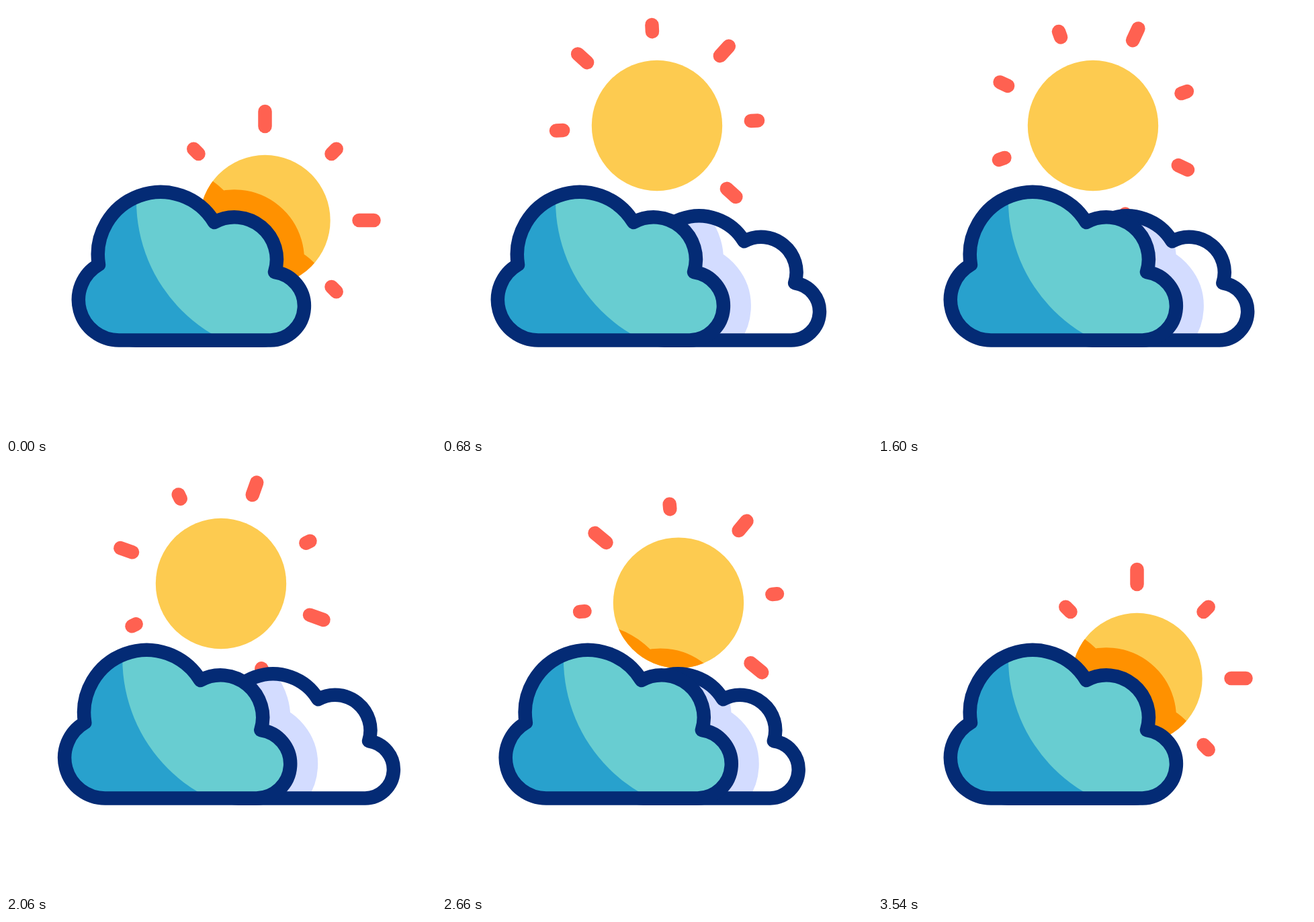
An HTML page that plays this animation: 640 by 640 pixels, repeating every 3600 ms.

```html
<!DOCTYPE html>
<html lang="en">
<head>
<meta charset="utf-8">
<title>Sun and clouds</title>
<style>
  @property --sun-x { syntax: "<length>"; inherits: true; initial-value: 385.5px; }
  @property --sun-y { syntax: "<length>"; inherits: true; initial-value: 319px; }
  @property --spin  { syntax: "<angle>";  inherits: true; initial-value: 0deg; }
  @property --front { syntax: "<length>"; inherits: true; initial-value: 0px; }
  @property --back  { syntax: "<length>"; inherits: true; initial-value: -126px; }
  @property --shade { syntax: "<length>"; inherits: true; initial-value: 0px; }
  @property --ray-a { syntax: "<length>"; inherits: true; initial-value: 22px; }
  @property --ray-b { syntax: "<length>"; inherits: true; initial-value: 22px; }
  @property --ray-c { syntax: "<length>"; inherits: true; initial-value: 22px; }
  @property --short { syntax: "<length>"; inherits: true; initial-value: 10px; }

  html, body { margin: 0; width: 100%; height: 100%; overflow: hidden; background: #fff; }
  svg {
    display: block; width: 100%; height: 100%;
    animation: 3600ms linear infinite;
    animation-name: sun-x, sun-y, spin, front, back, shade, ray-a, ray-b, ray-c, short;
  }

  .sun   { transform: translate(var(--sun-x), var(--sun-y)); }
  .rays  { transform: rotate(var(--spin)); }
  .front { transform: translate(var(--front), 0px); }
  .back  { transform: translate(calc(177.7px + var(--back)), 80.1px) scale(.839); }
  .shade { transform: translate(calc(var(--front) - var(--shade)), var(--shade)); }

  .rays line { stroke: #ff6151; stroke-width: 20.5; stroke-linecap: round; stroke-dasharray: var(--short) 99px; }
  .rays .a { stroke-dasharray: var(--ray-a) 99px; }
  .rays .b { stroke-dasharray: var(--ray-b) 99px; }
  .rays .c { stroke-dasharray: var(--ray-c) 99px; }
  .halo { stroke-width: 82; stroke-linejoin: round; }
  .line { fill: none; stroke: #042b75; stroke-width: 20.5; stroke-linejoin: round; }
  .back.line { stroke-width: 24.4; }

  @keyframes sun-x {
    0%, 2.778% { --sun-x: 385.5px; animation-timing-function: cubic-bezier(.65, 0, .78, 1); }
    18.889% { --sun-x: 320px; }
    63.889% { --sun-x: 320px; animation-timing-function: cubic-bezier(.2, 0, .36, 1); }
    94.444%, 100% { --sun-x: 385.5px; }
  }
  @keyframes sun-y {
    0%, 2.778% { --sun-y: 319px; animation-timing-function: cubic-bezier(.41, 0, .49, 1); }
    18.889% { --sun-y: 178px; }
    63.889% { --sun-y: 178px; animation-timing-function: cubic-bezier(.51, 0, .45, 1); }
    94.444%, 100% { --sun-y: 319px; }
  }
  @keyframes spin {
    0%, 2.778% { --spin: 0deg; animation-timing-function: cubic-bezier(.27, 0, .54, .95); }
    22.222% { --spin: -51deg; }
    29.444% { --spin: -56deg; }
    44.444% { --spin: -65deg; }
    57.222% { --spin: -70.5deg; }
    63.889% { --spin: -73deg; animation-timing-function: cubic-bezier(.37, .12, .57, 1); }
    94.444%, 100% { --spin: 0deg; }
  }
  @keyframes front {
    0%, 2.778% { --front: 0px; animation-timing-function: cubic-bezier(.33, 0, .67, .67); }
    22.222% { --front: -31px; }
    44.444% { --front: 0px; }
    63.611% { --front: -31px; animation-timing-function: cubic-bezier(.33, .67, .67, 1); }
    93.333%, 100% { --front: 0px; }
  }
  @keyframes back {
    0%, 2.778% { --back: -126px; animation-timing-function: cubic-bezier(.33, 0, .67, .67); }
    22.222% { --back: 45px; animation-timing-function: cubic-bezier(.25, .52, .67, .67); }
    44.444% { --back: 0px; animation-timing-function: cubic-bezier(.33, .1, .67, .67); }
    64.167% { --back: 45px; animation-timing-function: cubic-bezier(.33, .26, .67, 1); }
    93.333%, 100% { --back: -126px; }
  }
  @keyframes shade {
    0%, 2.778% { --shade: 0px; animation-timing-function: cubic-bezier(.37, 0, .6, 1); }
    21% { --shade: 16px; }
    63.889% { --shade: 16px; animation-timing-function: cubic-bezier(.33, .67, .67, 1); }
    77.778%, 100% { --shade: 0px; }
  }
  @keyframes ray-a {
    0%, 10.556% { --ray-a: 22px; }
    29.444% { --ray-a: 15px; }
    44.444% { --ray-a: 12.7px; }
    57.222% { --ray-a: 18.7px; }
    73.889%, 100% { --ray-a: 22px; }
  }
  @keyframes ray-b {
    0%, 10.556% { --ray-b: 22px; }
    29.444% { --ray-b: 16px; }
    44.444% { --ray-b: 19.5px; }
    57.222% { --ray-b: 19.6px; }
    73.889% { --ray-b: 18.5px; }
    94.444%, 100% { --ray-b: 22px; }
  }
  @keyframes ray-c {
    0%, 10.556% { --ray-c: 22px; }
    29.444% { --ray-c: 13.5px; }
    44.444% { --ray-c: 15.5px; }
    57.222%, 100% { --ray-c: 21.8px; }
  }
  @keyframes short {
    0%, 29.444% { --short: 10.2px; }
    44.444% { --short: 9px; }
    57.222% { --short: 6.8px; }
    73.889% { --short: 7.5px; }
    94.444%, 100% { --short: 10.2px; }
  }
</style>
</head>
<body>
<svg viewBox="0 0 640 640">
  <defs>
    <path id="cloud" d="M168.5 497.5A60.3 60.3 0 0 1 138 385A93.3 93.3 0 0 1 310 322A62.8 62.8 0 0 1 400 396A51 51 0 0 1 393.5 497.5Z"/>
    <clipPath id="in-front"><use href="#cloud"/></clipPath>
    <clipPath id="in-back"><use href="#cloud" class="back"/></clipPath>
    <clipPath id="in-sun"><circle class="sun" r="97.2"/></clipPath>
  </defs>

  <g class="sun">
    <circle r="97.2" fill="#fdcb50"/>
    <g class="rays">
      <line class="a" y1="-140" y2="-170"/>
      <line y1="-140" y2="-170" transform="rotate(45)"/>
      <line class="b" y1="-140" y2="-170" transform="rotate(90)"/>
      <line y1="-140" y2="-170" transform="rotate(135)"/>
      <line class="c" y1="-140" y2="-170" transform="rotate(180)"/>
      <line y1="-140" y2="-170" transform="rotate(225)"/>
      <line class="a" y1="-140" y2="-170" transform="rotate(270)"/>
      <line y1="-140" y2="-170" transform="rotate(315)"/>
    </g>
  </g>
  <g clip-path="url(#in-sun)">
    <use href="#cloud" class="shade halo" fill="#ff9100" stroke="#ff9100"/>
  </g>

  <g clip-path="url(#in-back)">
    <rect width="640" height="640" fill="#fff"/>
    <use href="#cloud" class="front halo" fill="#d3dcff" stroke="#d3dcff"/>
  </g>
  <use href="#cloud" class="back line"/>

  <g class="front">
    <use href="#cloud" fill="#28a1cd"/>
    <g clip-path="url(#in-front)"><circle cx="425" cy="290" r="231" fill="#68cdd1"/></g>
    <use href="#cloud" class="line"/>
  </g>
</svg>
</body>
</html>
```
